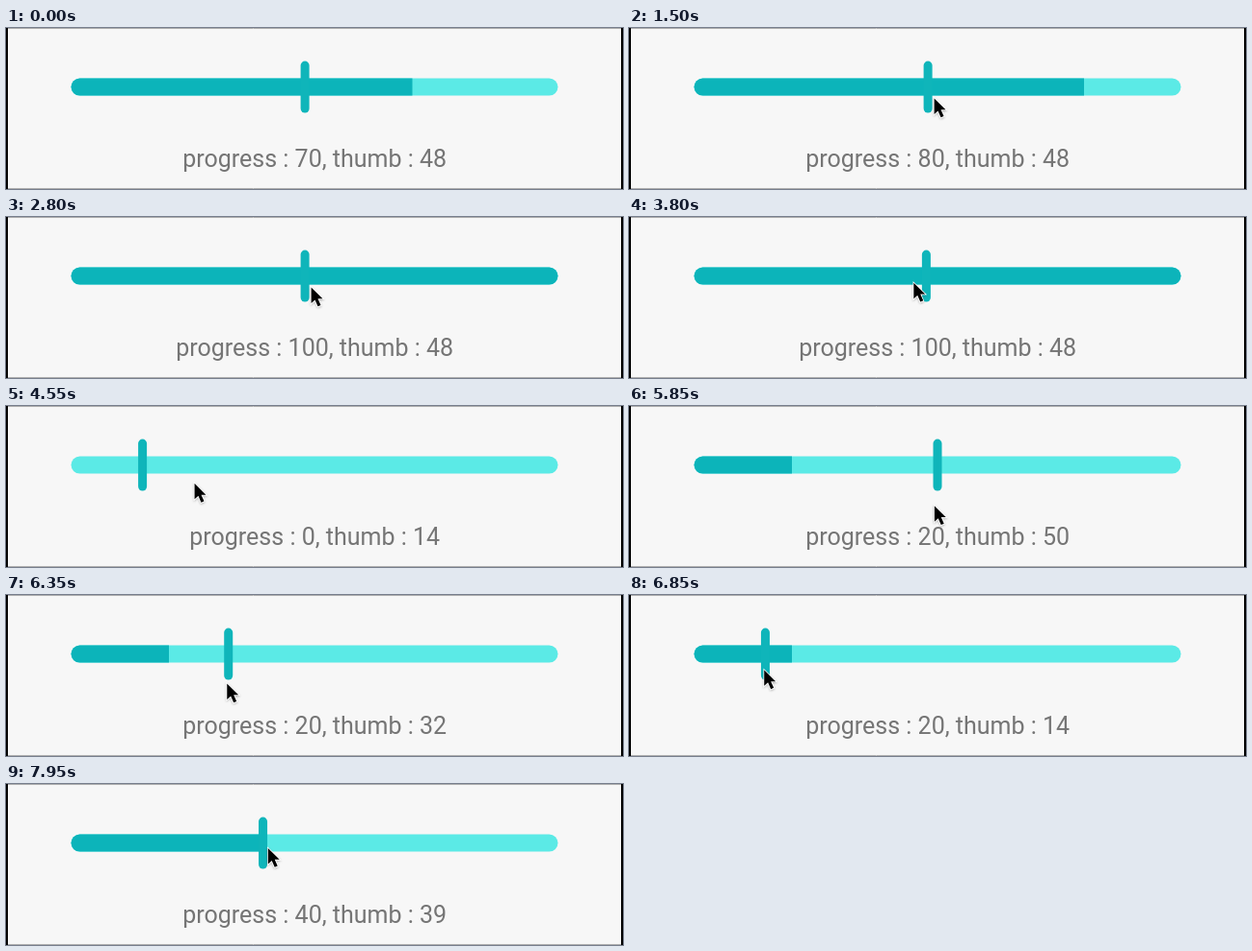
Animation of 640x168 px, one loop 8000 ms. Source, as an HTML page:

```html
<!DOCTYPE html>
<html lang="en">
<head>
<meta charset="utf-8">
<title>Slider with progress</title>
<style>
  html, body { margin: 0; width: 100%; height: 100%; overflow: hidden; background: #f7f7f7; }
  svg { display: block; }
  text { font: 25px Roboto, sans-serif; fill: #757575; text-anchor: middle; }
</style>
</head>
<body>
<svg width="640" height="168" viewBox="0 0 640 168">
  <defs>
    <clipPath id="track"><rect x="67.5" y="52.6" width="505" height="18" rx="9"/></clipPath>
    <filter id="shadow" x="-50%" y="-50%" width="200%" height="200%">
      <feDropShadow dx="0" dy="1" stdDeviation="1" flood-opacity=".3"/>
    </filter>
  </defs>
  <rect width="640" height="168" fill="#f7f7f7"/>
  <path d="M0 .5H640M0 167.5H640" stroke="#b0b0b0"/>
  <path d="M1 0V168M639 0V168" stroke="#000" stroke-width="2"/>
  <g clip-path="url(#track)">
    <rect x="67" y="52" width="506" height="19" fill="#5beae6"/>
    <rect id="bar" x="67" y="52" height="19" fill="#0cb4ba"/>
  </g>
  <rect id="thumb" y="34.6" width="9" height="54" rx="4.5" fill="#0fb5ba"/>
  <text id="label" x="320.2" y="144.5"></text>
  <g id="pointer">
    <path d="M1.5 1.5V17.9L5.4 14.4L8.4 21.3L11.4 20L8.4 13.3H13.4Z"
          stroke="#fff" stroke-width="1.5" paint-order="stroke" filter="url(#shadow)"/>
  </g>
</svg>
<script>
const LOOP = 8000, FRAME = 50, ENTER = 650;
const bar = document.getElementById('bar');
const thumb = document.getElementById('thumb');
const label = document.getElementById('label');
const pointer = document.getElementById('pointer');

const linear = u => u;
const smooth = u => (1 - Math.cos(Math.PI * u)) / 2;
const bell = (t, peak, width) => Math.exp(-(((t - peak) / width) ** 2));
// Eased 0 to 1 between two times
const ramp = (t, from, to, ease = smooth) =>
  ease(Math.min(1, Math.max(0, (t - from) / (to - from))));

// Turning points of the drag: time, value, easing towards it
const stops = [
  [3770, 48], [4300, 3.8], [5480, 99], [5850, 50], [7200, 1.3, linear], [7600, 1.3], [8000, 40.7]
];

const valueAt = t => stops.slice(1).reduce((value, [time, target, ease], i) =>
  value + (target - stops[i][1]) * ramp(t, stops[i][0], time, ease), stops[0][1]);

// Gains 10 about once a second and wraps after 100
const progressAt = t => (7 + Math.floor((t + 243) / 1014)) % 11 * 10;

const thumbX = value => 72.5 + 4.95 * value;

// The pointer runs ahead of the thumb, most of all in the fast sweep
function pointerAt(t) {
  const lead = 15 + 100 * bell(t, 4550, 877);
  const away = 1 - ramp(t, ENTER, 1400);
  const hover = 1 - ramp(t, 3000, 3800);
  return [
    thumbX(valueAt(t + lead)) + 5 * hover + 20 * away,
    65 + 39 * bell(t, 5650, 1100) + 7 * hover + 98 * away
  ];
}

function draw(now) {
  const t = Math.floor(now % LOOP / FRAME) * FRAME;
  const value = valueAt(t), progress = progressAt(t);
  bar.setAttribute('width', 1 + 5.05 * progress);
  bar.setAttribute('visibility', progress ? 'visible' : 'hidden');
  thumb.setAttribute('x', thumbX(value) - 4.5);
  label.textContent = `progress : ${progress}, thumb : ${Math.round(value)}`;
  pointer.setAttribute('visibility', t > ENTER ? 'visible' : 'hidden');
  pointer.setAttribute('transform', `translate(${pointerAt(t)})`);
}

const start = performance.now();
function tick() {
  draw(performance.now() - start);
  requestAnimationFrame(tick);
}
tick();
</script>
</body>
</html>
```
